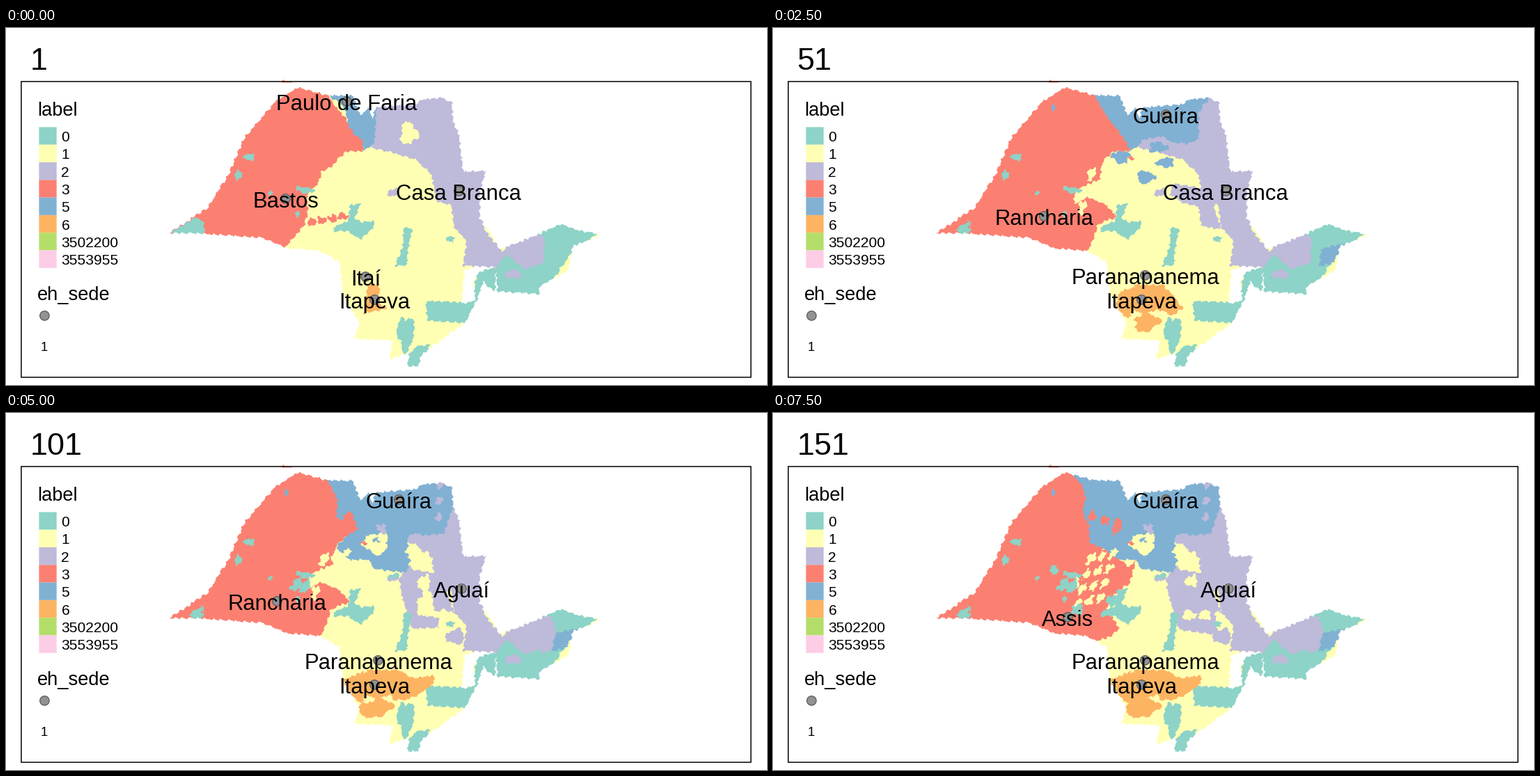
A matplotlib script for the animation above (8000 ms loop, 1093 by 513 pixels).

```python
import numpy as np
import matplotlib.pyplot as plt
from matplotlib.animation import FuncAnimation
from matplotlib.patches import Circle, PathPatch, Polygon, Rectangle
from matplotlib.path import Path

W, H, DPI = 1093, 513, 64
STEPS, STEP_MS = 16, 500
PX = 72 / DPI  # points per pixel
SHIFT = .6     # coordinates below name pixel centres

TEAL, YELLOW, PURPLE, RED = "#8DD3C7", "#FFFFB3", "#BEBADA", "#FB8072"
BLUE, ORANGE, GREEN, PINK = "#80B1D3", "#FDB462", "#B3DE69", "#FCCDE5"

plt.rcParams["font.family"] = "Liberation Sans"
fig = plt.figure(figsize=(W / DPI, H / DPI), dpi=DPI, facecolor="white")
ax = fig.add_axes([0, 0, 1, 1])
ax.set_xlim(SHIFT, W + SHIFT)
ax.set_ylim(H + SHIFT, SHIFT)
ax.axis("off")

timed = []  # (artist, first step, step after the last)


def show(artist, first=0, end=STEPS, z=1.0):
    artist.set_zorder(z)
    ax.add_artist(artist)
    timed.append((artist, first, end))


def warp(p):
    """Ragged shift that depends on place only, so shared borders agree."""
    x, y = p.T
    dx = 1.1 * np.sin(.62 * y + .21 * x) + .8 * np.sin(1.05 * y - .5 * x + 1)
    dy = 1.1 * np.sin(.58 * x - .25 * y) + .8 * np.sin(1.1 * x + .45 * y + 2)
    return p + np.column_stack([dx, dy])


def ragged(corners):
    pts = np.array(corners, float)
    out = []
    for a, b in zip(pts, np.roll(pts, -1, axis=0)):
        n = max(1, int(np.hypot(*(b - a)) / 1.8))
        out.append(a + (b - a) * np.arange(n)[:, None] / n)
    return warp(np.vstack(out))


# A claim stays from its step on; later claims paint over earlier ones.
def claim(step, color, outline):
    show(Polygon(outline, fc=color, lw=0), step, z=1 + len(timed) / 1000)


def area(step, color, *corners):
    claim(step, color, ragged(corners))


def blob(step, color, x, y, rx, ry, tilt=0):
    t = np.linspace(0, 2 * np.pi, 40, endpoint=False)
    r = 1 + .16 * np.sin(3 * t + x) + .1 * np.sin(5 * t + y)
    z = r * (rx * np.cos(t) + 1j * ry * np.sin(t)) * np.exp(1j * np.radians(tilt))
    claim(step, color, warp(np.column_stack([x + z.real, y + z.imag])))


def row(step, color, n, a, b, rx, ry, tilt=0):
    """n enclaves evenly spaced from a to b."""
    for x, y in np.linspace(a, b, n):
        blob(step, color, x, y, rx, ry, tilt)


def text(x, y, s, px, **kw):
    return ax.text(x, y, s, fontsize=px * PX, va="baseline", zorder=5, **kw)


state = ragged([
    (236, 295), (290, 259), (319, 213), (344, 157), (389, 105), (421, 86),
    (460, 97), (499, 98), (509, 126), (522, 115), (527, 132), (531, 115),
    (588, 110), (598, 103), (625, 101), (641, 108), (643, 138), (651, 152),
    (657, 207), (690, 206), (681, 235), (681, 273), (698, 298), (709, 318),
    (733, 310), (766, 297), (799, 282), (818, 290), (856, 298), (815, 314),
    (808, 350), (767, 371), (766, 383), (707, 379), (704, 350), (703, 380),
    (686, 365), (677, 393), (659, 425), (622, 452), (596, 471), (594, 486),
    (577, 487), (580, 468), (551, 476), (556, 450), (501, 447), (508, 425),
    (484, 385), (480, 338), (452, 321), (404, 317), (367, 302), (283, 296)])
claim(0, YELLOW, state)

# opening clusters
area(0, TEAL, (705, 335), (722, 315), (770, 280), (860, 290), (815, 320),
     (766, 392), (704, 386))
area(0, TEAL, (603, 393), (668, 395), (680, 345), (708, 345), (706, 385),
     (664, 425), (606, 421))
area(0, RED, (230, 300), (310, 205), (340, 140), (400, 75), (461, 95),
     (487, 130), (514, 164), (513, 178), (488, 178), (472, 196), (454, 208),
     (450, 222), (433, 240), (434, 268), (428, 286), (400, 317), (380, 325))
area(0, TEAL, (230, 300), (272, 272), (284, 280), (287, 302))
area(0, PURPLE, (524, 172), (528, 100), (660, 95), (700, 200), (685, 285),
     (712, 322), (748, 290), (774, 300), (773, 338), (745, 347), (720, 326),
     (704, 345), (657, 342), (662, 308), (644, 285), (640, 255), (619, 250),
     (612, 212), (590, 190), (560, 181))
blob(0, PURPLE, 729, 355, 12, 6)
blob(0, PURPLE, 557, 237, 8, 5, -25)
area(0, BLUE, (455, 90), (500, 92), (504, 112), (533, 112), (530, 165),
     (514, 178), (513, 164), (494, 145), (487, 115))
blob(0, YELLOW, 579, 152, 12, 16)
row(0, RED, 4, (440, 280), (484, 271), 7, 5)
area(0, ORANGE, (520, 369), (537, 370), (537, 398), (549, 403), (515, 411))

# first jump: new seats in west, north and south
area(1, RED, (230, 300), (276, 268), (290, 302))
area(1, RED, (432, 255), (452, 243), (480, 255), (492, 269), (467, 284),
     (460, 306), (450, 325), (380, 325))
area(1, RED, (445, 200), (474, 188), (470, 218), (436, 232))
row(1, YELLOW, 2, (458, 210), (445, 258), 10, 5, -70)
blob(1, PURPLE, 579, 155, 15, 18)
blob(1, PURPLE, 628, 270, 10, 17)
area(1, BLUE, (500, 115), (600, 98), (612, 128), (592, 164), (577, 166),
     (560, 156), (525, 163), (514, 176), (500, 150))
blob(1, PURPLE, 545, 125, 13, 7)
area(1, ORANGE, (491, 402), (500, 378), (535, 370), (562, 370), (590, 403),
     (575, 414), (555, 405), (510, 417))
blob(3, ORANGE, 536, 423, 18, 14)
blob(3, YELLOW, 521, 413, 9, 5, -30)
area(3, BLUE, (788, 318), (822, 310), (806, 337), (785, 343))

# blue grows along the north, purple to the south-west
area(4, BLUE, (461, 97), (605, 95), (628, 100), (612, 122), (612, 160),
     (592, 168), (560, 155), (508, 162), (489, 140))
row(4, BLUE, 2, (500, 186), (536, 215), 13, 9)
row(4, BLUE, 2, (554, 172), (564, 194), 13, 7)
area(4, PURPLE, (570, 238), (576, 224), (625, 232), (645, 290), (615, 285),
     (612, 257), (588, 252))
area(6, BLUE, (600, 98), (640, 106), (643, 134), (630, 174), (600, 177),
     (570, 168), (552, 162), (527, 160), (516, 176), (508, 160))
blob(6, BLUE, 543, 216, 20, 9)
blob(6, BLUE, 568, 195, 14, 13, 70)
blob(6, PURPLE, 537, 166, 12, 8)
row(6, PURPLE, 3, (624, 104), (622, 150), 5, 5)
area(6, PURPLE, (768, 295), (783, 292), (791, 315), (784, 342), (768, 346))
area(6, PURPLE, (565, 238), (580, 220), (604, 250), (590, 290), (622, 295),
     (622, 309), (584, 311), (570, 268))
row(6, YELLOW, 3, (602, 215), (600, 277), 9, 13)
blob(6, YELLOW, 631, 293, 10, 10)
blob(6, ORANGE, 588, 394, 13, 12)

# blue breaks through towards the centre
area(9, BLUE, (462, 97), (477, 125), (475, 150), (508, 167), (486, 180),
     (475, 195), (495, 212), (518, 211), (545, 227), (576, 230), (581, 212),
     (568, 185), (590, 172), (520, 140))
blob(9, RED, 494, 156, 9, 13, -25)
blob(9, YELLOW, 532, 188, 18, 15)
blob(9, BLUE, 533, 183, 4, 4)
blob(9, PURPLE, 540, 167, 8, 6, 45)
row(9, YELLOW, 2, (583, 199), (606, 213), 7, 8)
blob(9, PURPLE, 646, 322, 13, 11)
area(9, ORANGE, (560, 368), (585, 382), (615, 378), (616, 388), (590, 408),
     (555, 414))
area(9, ORANGE, (482, 385), (515, 372), (500, 405))
blob(9, ORANGE, 524, 427, 18, 10)

# west: red gains the middle and loses its north-east
area(11, RED, (440, 232), (478, 195), (505, 232), (485, 262), (480, 280),
     (497, 309), (488, 321), (466, 328), (440, 322))
area(11, BLUE, (441, 88), (450, 126), (446, 146), (455, 162), (455, 188),
     (478, 196), (515, 165), (490, 90))
row(11, RED, 3, (468, 136), (496, 164), 12, 6, -50)
blob(11, BLUE, 485, 160, 4, 8)
area(14, BLUE, (428, 85), (452, 115), (445, 140), (465, 162), (508, 168),
     (500, 120))
row(14, RED, 3, (459, 149), (496, 160), 6, 7)
area(14, RED, (490, 205), (512, 222), (522, 213), (512, 246), (486, 264))
for j in range(4):  # yellow enclaves spread south, one line a step
    start = np.array([457 - 6 * j, 211 + 21 * j])
    row(9 + j, YELLOW, 3, start, start + (32, -8), 9, 4, -50)
area(13, PURPLE, (566, 250), (600, 248), (632, 262), (640, 320), (584, 312))
row(13, YELLOW, 2, (598, 291), (621, 291), 9, 7)
blob(13, ORANGE, 521, 413, 10, 6, -30)

# teal enclaves
blob(1, TEAL, 275, 290, 9, 8)
for spot in [(350, 186, 7, 5), (334, 212, 5, 7), (380, 238, 4, 2, -30),
             (430, 233, 13, 4, 8), (419, 268, 3, 5), (639, 304, 6, 4)]:
    blob(0, TEAL, *spot)
blob(1, BLUE, 404, 115, 3, 4)
blob(1, RED, 515, 187, 4, 3)
row(9, TEAL, 2, (418, 247), (430, 250), 11, 6, -50)
blob(9, TEAL, 558, 235, 8, 3, -15)
row(11, TEAL, 2, (438, 284), (487, 270), 8, 8)
blob(14, TEAL, 404, 226, 6, 7)
area(0, TEAL, (495, 255), (510, 253), (502, 275), (510, 280), (528, 278),
     (530, 285), (510, 305), (490, 292), (472, 293), (470, 287), (492, 278))
area(0, TEAL, (572, 288), (584, 288), (577, 325), (577, 341), (559, 343),
     (570, 318))
blob(0, TEAL, 575, 439, 12, 24)
area(0, TEAL, (590, 458), (610, 455), (600, 490), (572, 490), (574, 474))

# bay left blank, then everything outside the state
area(0, "white", (659, 348), (675, 343), (704, 344), (683, 350), (672, 363),
     (675, 391), (655, 397))
sheet = Path([(200, 79), (900, 79), (900, 500), (200, 500), (200, 79)], closed=True)
hole = Path(np.vstack([state[::-1], state[-1:]]), closed=True)
show(PathPatch(Path.make_compound_path(sheet, hole), fc="white", lw=0), z=2)

# frame and legend
show(Rectangle((22.5, 77.5), 1048, 425, fill=False, ec="black", lw=1.5 * PX,
               snap=False), z=4)
keys = dict(zip(["0", "1", "2", "3", "5", "6", "3502200", "3553955"],
                [TEAL, YELLOW, PURPLE, RED, BLUE, ORANGE, GREEN, PINK]))
for k, (name, color) in enumerate(keys.items()):
    y = 143 + 25.3 * k
    show(Rectangle((48, y), 25.3, 25.3, fc=color, lw=0, snap=False), z=4)
    text(80, y + 20.6, name, 21)
text(45.5, 127, "label", 27.3)
text(45.5, 392, "eh_sede", 27.3)
text(50.5, 465, "1", 18.5)
title = text(35, 60.6, "1", 45)


def seat(x, y, name="", first=0, end=STEPS):
    show(Circle((x, y), 6.7, fc="#929292", ec="#5c5c5c", lw=1.3 * PX),
         first, end, 4)
    label = text(x, y + 12.3, name, 31, ha="center")
    timed.append((label, first, end))


seat(56, 414)
seat(490, 106, "Paulo de Faria", 0, 1)
seat(565, 125, "Guaíra", 1)
seat(651, 235, "Casa Branca", 0, 7)
seat(655, 253, "Aguaí", 7)
seat(402, 246, "Bastos", 0, 1)
seat(390, 271, "Rancharia", 1, 11)
seat(424, 294, "Assis", 11)
seat(517, 358, "Itaí", 0, 1)
seat(535, 356, "Paranapanema", 1)
seat(530, 391, "Itapeva")


def draw(step):
    title.set_text(str(10 * step + 1))
    for artist, first, end in timed:
        artist.set_visible(first <= step < end)
    return []


anim = FuncAnimation(fig, draw, frames=STEPS, init_func=lambda: draw(0),
                     interval=STEP_MS, repeat=True, repeat_delay=0, blit=False)
plt.show()
```
